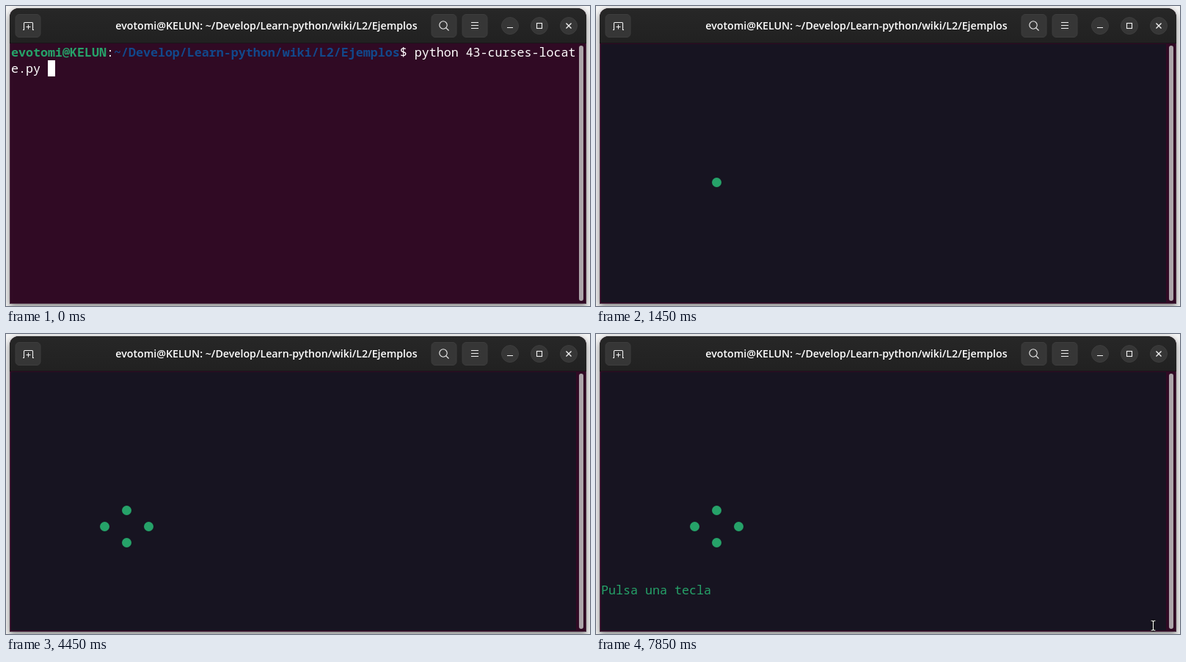
Recreate the animation shown at these times as an HTML page. Size 796 by 409 pixels, loop 8000 ms.

```html
<!DOCTYPE html>
<html lang="es">
<head>
<meta charset="utf-8">
<title>Terminal</title>
<style>
html, body { margin: 0; width: 100%; height: 100%; overflow: hidden; background: #f4f4f4; }
.window {
  position: absolute; left: 5px; top: 3px; width: 786px; height: 403px;
  border-radius: 12px 12px 0 0; background: #300a24;
  box-shadow: 0 3px 8px rgba(0, 0, 0, .5);
}
svg { position: absolute; left: 0; top: 0; display: block; }
.title { font: 600 14.2px "Open Sans", "Noto Sans", sans-serif; fill: #fff; text-anchor: middle; }
.term { font: 400 16.667px "Noto Sans Mono", "Liberation Mono", monospace; fill: #fff; white-space: pre; }
.bold { font-weight: 700; }
.green { fill: #26a269; }
.blue { fill: #12488b; }
.icon { fill: none; stroke: #f2f2f2; stroke-width: 1.1; }
.button { fill: #363636; stroke: #3d3d3d; }

.shell, .caret, .app, .dot, .hint, .arrow, .beam { animation: 8s step-end infinite; }
.shell { animation-name: shell; }
.caret { animation-name: blink; }
.app { animation-name: app; }
.left { animation-name: left; }
.right { animation-name: right; }
.bottom { animation-name: bottom; }
.hint { animation-name: hint; }
.arrow { animation-name: arrow; }
.beam { animation-name: beam; }

@keyframes shell { 0% { opacity: 1 } 18.125%, 100% { opacity: 0 } }
@keyframes blink { 0% { opacity: 1 } 5.625% { opacity: 0 } 13.75%, 100% { opacity: 1 } }
@keyframes app { 0% { opacity: 0 } 18.125%, 100% { opacity: 1 } }
@keyframes left { 0% { opacity: 0 } 30.625%, 100% { opacity: 1 } }
@keyframes right { 0% { opacity: 0 } 43.125%, 100% { opacity: 1 } }
@keyframes bottom { 0% { opacity: 0 } 55.625%, 100% { opacity: 1 } }
@keyframes hint { 0% { opacity: 0 } 68.125%, 100% { opacity: 1 } }
@keyframes arrow {
  0% { opacity: 0; transform: translate(0, 0) }
  91.875% { opacity: 1; transform: translate(0, 0) }
  92.5% { opacity: 1; transform: translate(7px, -1px) }
  93.125% { opacity: 1; transform: translate(13px, 0) }
  93.75% { opacity: 1; transform: translate(19px, 3px) }
  94.375%, 100% { opacity: 0; transform: translate(19px, 3px) }
}
@keyframes beam {
  0% { opacity: 0; transform: translate(0, 6px) }
  97.5% { opacity: 1; transform: translate(0, 6px) }
  98.125%, 100% { opacity: 1; transform: translate(0, 0) }
}
</style>
</head>
<body>
<div class="window"></div>
<svg width="796" height="409" viewBox="0 0 796 409">
  <defs>
    <linearGradient id="bar" x1="0" y1="0" x2="0" y2="1">
      <stop offset="0" stop-color="#272727"/>
      <stop offset="1" stop-color="#212121"/>
    </linearGradient>
  </defs>

  <path d="M5 51V15a12 12 0 0 1 12-12H779a12 12 0 0 1 12 12V51Z" fill="url(#bar)"/>
  <path d="M5 50.5H791" stroke="#1b151a"/>
  <path d="M5.5 51V405.5H790.5V51" fill="none" stroke="#4b2a41"/>

  <g class="button">
    <rect x="13" y="11.5" width="34" height="31" rx="5"/>
    <rect x="580" y="11.5" width="34" height="31" rx="5"/>
    <rect x="622" y="11.5" width="34" height="31" rx="5"/>
    <circle cx="687" cy="27" r="11.5"/>
    <circle cx="727" cy="27" r="11.5"/>
    <circle cx="767" cy="27" r="11.5"/>
  </g>
  <g class="icon">
    <path d="M23 32.5H24.5V23.5Q24.5 22.5 25.5 22.5H35.5Q36.5 22.5 36.5 23.5V32.5H38M30.5 25.5V31.5M27.5 28.5H33.5"/>
    <circle cx="596" cy="26" r="5.2"/>
    <path d="M599.8 29.8L603.5 33.5M634 22.5H644M634 26.5H644M634 30.5H644M683 29.5H691"/>
    <rect x="723.5" y="23.5" width="7" height="7"/>
    <path d="M763.5 23.5L770.5 30.5M770.5 23.5L763.5 30.5" stroke-width="1.4"/>
  </g>
  <text class="title" x="355" y="32">evotomi@KELUN: ~/Develop/Learn-python/wiki/L2/Ejemplos</text>

  <g class="shell">
    <text class="term" x="7" y="69"><tspan class="bold green">evotomi@KELUN</tspan>:<tspan class="bold blue">~/Develop/Learn-python/wiki/L2/Ejemplos</tspan>$ python 43-curses-locat</text>
    <text class="term" x="7" y="91">e.py</text>
    <rect class="caret" x="57" y="74" width="10" height="22" fill="#fff"/>
  </g>

  <g class="app">
    <rect x="7" y="52" width="770" height="352" fill="#171421"/>
    <g class="green">
      <circle cx="164.5" cy="240.5" r="6.5"/>
      <circle class="dot left" cx="134.5" cy="262.5" r="6.5"/>
      <circle class="dot right" cx="194.5" cy="262.5" r="6.5"/>
      <circle class="dot bottom" cx="164.5" cy="284.5" r="6.5"/>
    </g>
    <text class="term green hint" x="7" y="355">Pulsa una tecla</text>
  </g>

  <rect x="781" y="54" width="6" height="348" rx="3" fill="#aca4a9"/>

  <path class="arrow" d="M727 397L731 404.5H723Z" fill="#171421" stroke="#fff" stroke-width="1.2"/>
  <g class="beam" fill="none">
    <path d="M756.5 391H758.5L759.5 392L760.5 391H762.5M759.5 392V403M756.5 404H758.5L759.5 403L760.5 404H762.5" stroke="#000" stroke-width="3"/>
    <path d="M756.5 391H758.5L759.5 392L760.5 391H762.5M759.5 392V403M756.5 404H758.5L759.5 403L760.5 404H762.5" stroke="#fff" stroke-width="1.2"/>
  </g>
</svg>
</body>
</html>
```
